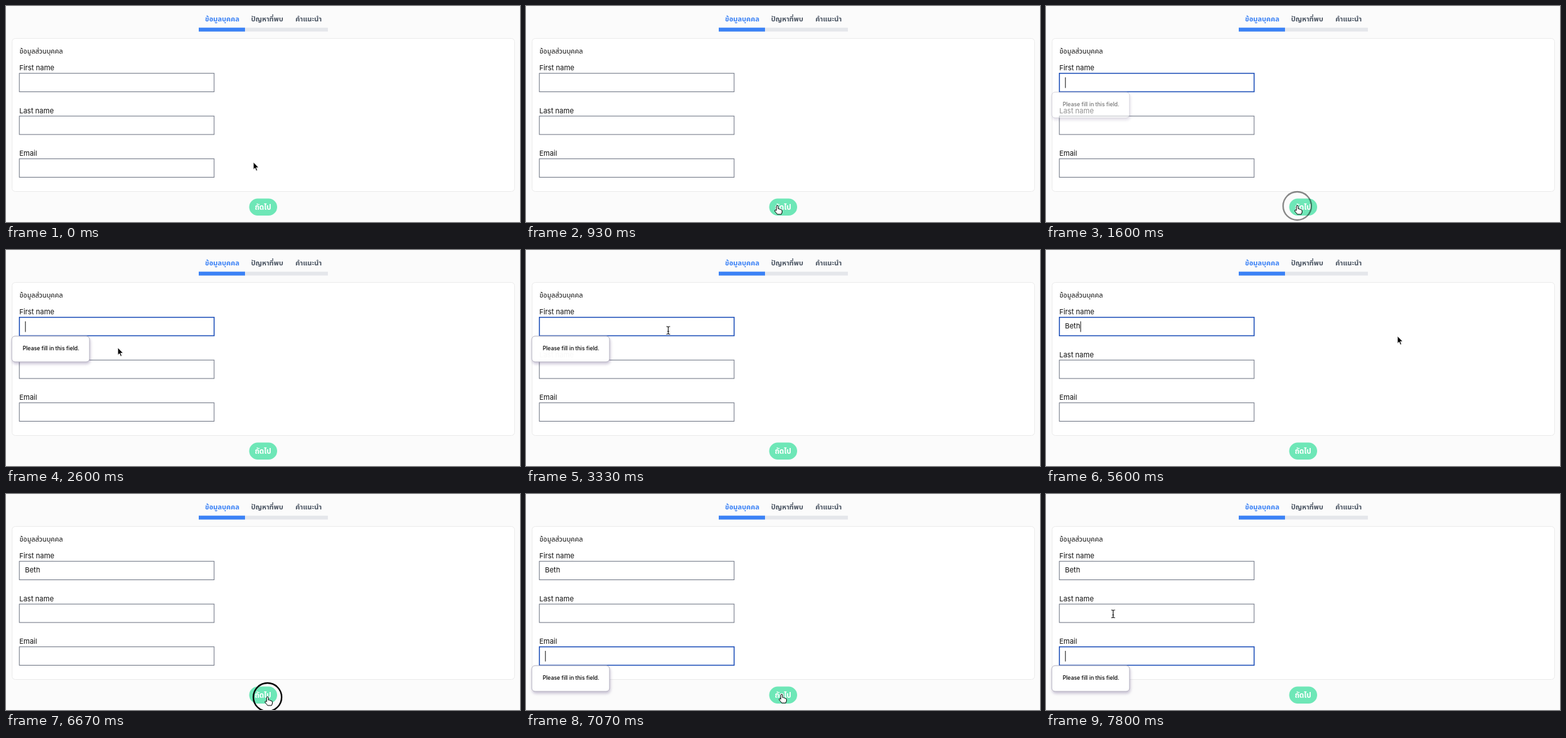
Recreate the animation shown at these times as an HTML page. Size 800 px wide and 336 px high, loop 8000 ms.

```html
<!DOCTYPE html>
<html lang="th">
<head>
<meta charset="utf-8">
<style>
html, body { margin: 0; width: 100%; height: 100%; overflow: hidden; background: #fbfbfb; }
svg { display: block; width: 800px; height: 336px; }
text { font-family: Inter, "Noto Sans Thai", "Noto Sans", sans-serif; font-size: 11px; fill: #111; }
.tab { font-size: 10.8px; font-weight: 600; fill: #4b5563; text-anchor: middle; }
.note { font-size: 8.5px; font-weight: 500; fill: #000; }
.field { fill: #fff; stroke: #6b7280; }
.field.on { stroke: #1d4fb8; stroke-width: 1.5; }
#popup rect { filter: drop-shadow(1px 3px 2px #5b4a8050); }
#cursor path { stroke-linejoin: round; stroke-linecap: round; }
</style>
</head>
<body>
<svg viewBox="0 0 800 336">
  <text class="tab" x="336.5" y="24" style="fill:#3b82f6">ข้อมูลบุคคล</text>
  <text class="tab" x="406.5" y="24">ปัญหาที่พบ</text>
  <text class="tab" x="471" y="24">คำแนะนำ</text>
  <rect x="300" y="33.7" width="201" height="6" fill="#e5e7eb"/>
  <rect x="300" y="33.7" width="72" height="6" fill="#3b82f6"/>

  <rect x="9.5" y="50.5" width="782" height="238" rx="5" fill="#fff" stroke="#ebebeb"/>
  <text x="21" y="73.5" style="font-size:10.6px;font-weight:500">ข้อมูลส่วนบุคคล</text>
  <g id="form"></g>
  <text id="typed" x="29.5" y="122"></text>
  <rect id="caret" width="1" height="16.5" fill="#111"/>

  <rect x="378.5" y="299.5" width="43.5" height="26.5" rx="13.25" fill="#6ee7b7"/>
  <text class="tab" x="400" y="316.5" style="fill:#fff;font-size:11.5px">ถัดไป</text>

  <g id="popup">
    <rect x="9" y="134" width="121" height="40" rx="5" fill="#fff" stroke="#b4b2c0"/>
    <text class="note" x="26" y="156">Please fill in this field.</text>
  </g>
  <g id="tip">
    <rect x="140" y="137" width="94" height="16.5" rx="3" fill="#e2e2e2"/>
    <text class="note" x="143" y="148">Please fill in this field.</text>
  </g>
  <g id="cursor">
    <circle id="ring" r="22" fill="none" stroke="#000" stroke-width="2.3"/>
    <path id="arrow" fill="#000" stroke="#fff" stroke-width=".9" d="M0 0V11.6L2.6 9.1 4.4 13.4 6.4 12.6 4.6 8.4H8.2Z"/>
    <path id="hand" fill="#fff" stroke="#000" d="M-1.3 6.8V.8A1.35 1.35 0 0 1 1.4 .8V4.6Q3 3.8 3.6 5.1 5.2 4.6 5.7 6 7.6 5.7 7.6 7.7V9Q7.5 11 6.3 13H.2Q-1.3 11-3.8 8.1-4.2 6.2-2.7 6.3Z"/>
    <path id="beam" fill="none" stroke="#222" stroke-width="1.2" d="M-2.5-6Q0-6 0-4.5 0-6 2.5-6M0-4.5V4.5M-2.5 6Q0 6 0 4.5 0 6 2.5 6M-1 1.5H1"/>
  </g>
</svg>
<script>
const LOOP = 8000, STEP = 200 / 3, BLINK = 950, FADE = 130, ROW = 66.5;
const NAME = "Beth", TYPE_START = 4200, KEY_GAP = 175;
const LABELS = ["First name", "Last name", "Email"];

const el = id => document.getElementById(id);
const show = (id, alpha) => el(id).setAttribute("opacity", +alpha);
const place = (id, x, y) => el(id).setAttribute("transform", `translate(${x} ${y})`);
const ramp = (t, a, b) => Math.min(1, Math.max(0, (t - a) / (b - a)));
const pulse = (t, a, b) => ramp(t, a, a + FADE) - ramp(t, b, b + FADE);
const ease = k => (1 - Math.cos(Math.PI * k)) / 2;
const fieldTop = row => 104.7 + ROW * row;

el("form").innerHTML = LABELS.map((label, row) =>
  `<text x="20.7" y="${fieldTop(row) - 4.5}">${label}</text>
   <rect class="field" x="20.8" y="${fieldTop(row)}" width="303.1" height="28.7"/>`).join("");
const fields = document.querySelectorAll(".field");

// pointer moves: from time, to time, x, y reached
const moves = [
  [100, 130, 384, 249], [470, 930, 391, 311], [2200, 2600, 174, 152], [2800, 3530, 231, 119.5],
  [5330, 5600, 547, 134], [5600, 5730, 541, 147], [5930, 6530, 407, 316], [7000, 7600, 104.5, 186.5]
];
// button down, button up
const clicks = [[1070, 1530], [5670, 5900], [6530, 6730]];

function pointer(t) {
  let x = 385, y = 243;
  for (const [from, to, u, v] of moves) {
    const k = ease(ramp(t, from, to));
    x += (u - x) * k;
    y += (v - y) * k;
  }
  return [x, y];
}

function focus(t) {
  const [submit, away, again] = clicks.map(([, up]) => up);
  if (t > again) return { row: 2, since: again + STEP };
  return t > submit && t < away ? { row: 0, since: submit + STEP } : { row: -1, since: 0 };
}

function draw(t) {
  const [x, y] = pointer(t);
  const inField = x > 20 && x < 324 && LABELS.some((_, row) => Math.abs(y - fieldTop(row) - 14.5) < 14.5);
  const onButton = x > 378 && x < 422 && y > 299 && y < 326;
  const kind = inField ? "beam" : onButton ? "hand" : "arrow";
  for (const id of ["arrow", "hand", "beam"]) show(id, id === kind);
  place("cursor", x, y);
  show("cursor", t < 3930 || t >= 5130);
  show("ring", Math.max(...clicks.map(([down, up]) => pulse(t, down, up))));

  const { row, since } = focus(t);
  fields.forEach((field, i) => field.classList.toggle("on", i === row));

  const typed = el("typed");
  typed.textContent = NAME.slice(0, Math.max(0, Math.floor((t - TYPE_START) / KEY_GAP) + 1));
  const written = row === 0 ? typed.getComputedTextLength() : 0;
  el("caret").setAttribute("x", 29.7 + written);
  el("caret").setAttribute("y", fieldTop(Math.max(0, row)) + 6.3);
  show("caret", row >= 0 && (written > 0 || (t - since) % BLINK < BLINK / 2));

  place("popup", 0, ROW * Math.max(0, row));
  show("popup", pulse(t, 1530, 3330) + pulse(t, 6730, LOOP));
  show("tip", pulse(t, 3800, TYPE_START));
}

function tick() {
  const t = performance.now() % LOOP;
  draw(Math.floor((t + 5) / STEP) * STEP);
  requestAnimationFrame(tick);
}
tick();
</script>
</body>
</html>
```
